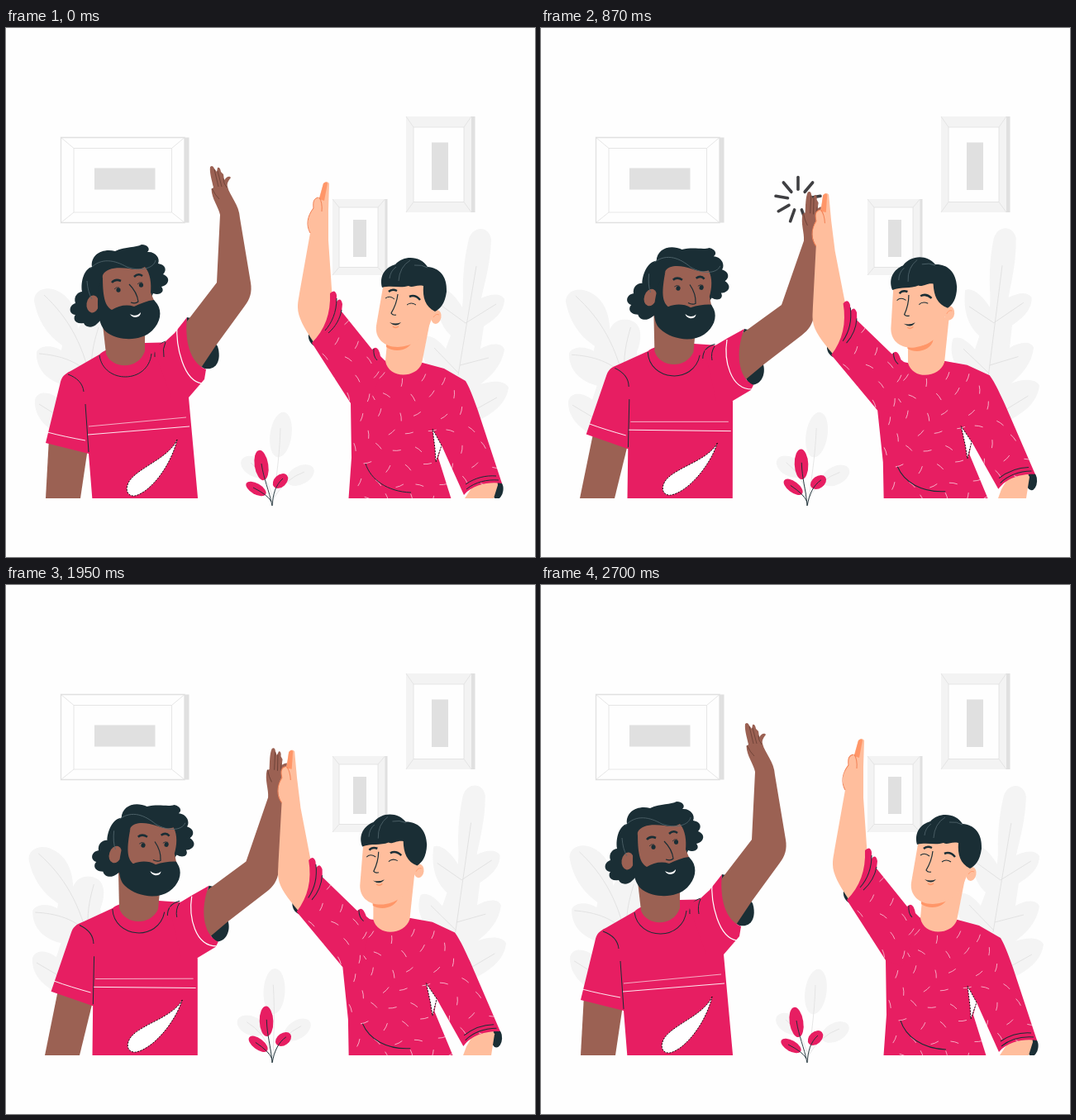
An HTML page with a canvas for the animation above (2.73 s loop, 640 px wide and 640 px high).

```html
<!DOCTYPE html>
<html lang="en">
<head>
<meta charset="utf-8">
<title>High five</title>
<style>
html, body { margin: 0; width: 100%; height: 100%; overflow: hidden; background: #fefefe; }
canvas { display: block; width: 640px; height: 640px; }
</style>
</head>
<body>
<canvas id="stage" width="640" height="640"></canvas>
<script>
const ctx = document.getElementById('stage').getContext('2d');
const LOOP = 2730, STEP = 30, FLOOR = 569;
const PINK = '#e71e62', DARK = '#1a2e35', BROWN = '#9b6153', PEACH = '#ffbe9d',
  ORANGE = '#ff9668', LEAF = '#f4f4f4', GREY = '#e0e0e0', PAPER = '#fefefe';

// Cosine-eased interpolation through [time, value] keys.
function keys(t, list) {
  for (let i = 1; i < list.length; i++) {
    const [t0, a] = list[i - 1], [t1, b] = list[i];
    if (t <= t1) return a + (b - a) * (1 - Math.cos(Math.PI * (t - t0) / (t1 - t0))) / 2;
  }
  return list[list.length - 1][1];
}

function fill(d, color) {
  ctx.fillStyle = color;
  ctx.fill(new Path2D(d));
}

function line(d, color = DARK, width = 1, dash = []) {
  ctx.strokeStyle = color;
  ctx.lineWidth = width;
  ctx.setLineDash(dash);
  ctx.stroke(new Path2D(d));
  ctx.setLineDash([]);
}

function oval(x, y, rx, ry, color, deg = 0) {
  ctx.fillStyle = color;
  ctx.beginPath();
  ctx.ellipse(x, y, rx, ry, deg * Math.PI / 180, 0, 2 * Math.PI);
  ctx.fill();
}

function box(x0, y0, x1, y1, color) {
  ctx.fillStyle = color;
  ctx.fillRect(x0, y0, x1 - x0, y1 - y0);
}

// Rotates a part about (x, y) while that point travels by (dx, dy).
function part(x, y, deg, draw, dx = 0, dy = 0) {
  ctx.save();
  ctx.translate(x + dx, y + dy);
  ctx.rotate(deg * Math.PI / 180);
  ctx.translate(-x, -y);
  draw();
  ctx.restore();
}

// Blends two paths with the same commands.
function morph(from, to, k) {
  const ends = to.match(/-?[\d.]+/g);
  let i = 0;
  return from.replace(/-?[\d.]+/g, n => +n + (ends[i++] - n) * k);
}

function pictureFrame([x0, y0, x1, y1], [a0, b0, a1, b1], bar, depth, face) {
  box(x0, y0, x1 + depth, y1, GREY);
  box(x0, y0, x1, y1, face);
  box(a0, b0, a1, b1, PAPER);
  line(`M${x0} ${y0}L${a0} ${b0}M${x1} ${y0}L${a1} ${b0}M${x0} ${y1}L${a0} ${b1}M${x1} ${y1}L${a1} ${b1}` +
    `M${a0} ${b0}H${a1}V${b1}H${a0}Z`, GREY, 0.8);
  if (face === PAPER) line(`M${x0} ${y0}H${x1}V${y1}H${x0}Z`, GREY, 1.3);
  box(...bar, GREY);
}

function pictures() {
  pictureFrame([66.5, 132.5, 216, 235.5], [82, 145.5, 200.5, 223], [107, 169.5, 180.5, 195.5], 5.5, PAPER);
  pictureFrame([484, 107, 563, 223], [493, 120, 554, 210.5], [515, 138.5, 535, 196], 4.5, '#f3f3f3');
  pictureFrame([395, 207, 458.5, 299], [403, 217, 450, 289.5], [420, 232, 436, 277], 3, '#f3f3f3');
}

function leftPlant() {
  fill('M34 330C34 316 50 312 62 318C79 326 86 342 87 364C92 352 106 349 117 356C126 363 125 378 119 392' +
    'L135 500L70 495C42 482 34 465 35 450C38 438 54 440 64 449L70 432C45 425 36 408 37 392C42 383 57 384 67 390' +
    'L68 384C48 370 38 352 34 330Z', LEAF);
  line('M46 323C75 350 96 385 105 440M105 425C100 400 108 375 112 362M40 394C65 396 90 403 106 425M40 455L80 480', GREY, 0.9);
}

function rightPlant() {
  fill('M553 325C552 295 556 272 560 255C566 238 585 240 587 256C586 285 580 305 575 327C586 322 598 320 603 328' +
    'C603 343 592 352 578 361L574 388C586 381 600 380 603 389C600 408 588 420 574 431C588 426 604 426 608 435' +
    'C605 456 588 466 572 475L530 480L520 420C505 408 500 390 506 374C514 370 524 378 532 388L538 372' +
    'C522 357 520 335 523 316C532 312 545 325 552 338Z', LEAF);
  line('M569 288L547 420M556 357L527 336M556 357L593 334M549 408L584 399M548 418L518 387M560 466L594 447', GREY, 0.9);
}

function smallPlant(greyLean, redLean) {
  part(323, 577, greyLean, () => {
    oval(332.5, 492, 13, 27.5, LEAF, 8);
    oval(301, 531, 18, 11.5, LEAF, 28);
    oval(356, 541, 18, 11, LEAF, -28);
    line('M332 484C331 520 326 550 323 577M296 526Q315 540 322 565M361 537Q338 545 323 570', GREY, 0.8);
  });
  part(322, 578, redLean, () => {
    oval(309, 529, 8.3, 18.3, PINK, -9);
    oval(302.5, 557.5, 13.5, 6.6, PINK, 30);
    oval(332, 548, 10.5, 7.3, PINK, -42);
    line('M309 527C312 547 318 558 322 578M299 556Q317 565 321 573M335 545C326 553 323 564 322 578', DARK, 0.9);
  });
}

function burst(x, y, age) {
  const u = age / 500;
  if (u <= 0 || u >= 1) return;
  const outer = 71 * Math.sin(u * Math.PI / 2) - 2;
  const inner = Math.min(outer - 2, 74 * u ** 1.45 + 1.5);
  if (inner < 0) return;
  ctx.lineCap = 'round';
  for (let i = 0; i < 9; i++) {
    const a = (i * 40 - 90) * Math.PI / 180, c = Math.cos(a), s = Math.sin(a);
    line(`M${x + c * inner} ${y + s * inner}L${x + c * outer} ${y + s * outer}`, '#3f3f42', 3.6);
  }
  ctx.lineCap = 'butt';
}

function leftTorso() {
  fill('M48 502L66 428C68 420 74 417 80 414L113 395C122 386 140 385 168 381L208 380L221 447L234 590H106L100 515Z', PINK);
  fill('M116 350L121 394C128 413 160 414 168 391V350Z', BROWN);
  line('M113 396C118 431 172 431 176 394M75 419C86 423 93 430 94 440M96 455L100 513M180 398C179 388 185 382 193 379');
  line('M99 492L222 482M50 489C65 493 80 496 96 499', '#fff', 0.9);
  line('M100 482L218 471', '#f8bed0', 0.9);
  const gap = 'M207 498C197 520 162 531 150 547C143 557 146 567 156 566C176 561 200 528 207 498Z';
  fill(gap, '#fff');
  line(gap, '#000', 0.9, [2, 1.5]);
}

function leftHead() {
  fill('M110 358C104 364 96 362 94 357C82 359 81 350 84 347C75 346 76 335 84 333C81 324 88 319 92 319' +
    'C90 306 95 291 104 289C102 275 116 266 132 270C145 264 157 266 164 262C172 262 175 268 171 271' +
    'C181 270 187 279 184 285C193 286 195 293 190 298C200 302 197 311 188 313C193 319 186 324 178 321L170 340L120 348Z', DARK);
  oval(105, 334, 7.5, 10.5, BROWN, 8);
  fill('M113 325L117 299C121 290 135 289 149 291C159 293 165 291 168 289C175 297 176 310 175 320L181 334L160 350L118 348Z', BROWN);
  fill('M112 315C109 345 113 362 123 369C140 380 165 378 177 366C187 356 189 343 183 334L179 329C171 330 163 333 155 337' +
    'C146 334 136 336 128 341C119 336 117 323 117 300Z', DARK);
  fill('M150 346C155 349 160 348 163 344C163 351 153 352 150 346Z', '#fff');
  line('M102 291C115 277 132 281 146 289C162 295 179 291 181 281M104 328Q99 320 98 306', '#53686f', 0.8);
  line('M149 310C156 317 159 323 160 331C157 334 154 333 151 332', DARK, 1.2);
  line('M128 308Q132 303 139 306M155 301Q160 296 165 300', DARK, 2.5);
  oval(136, 317, 2.6, 2.8, DARK);
  oval(163.5, 311, 2.6, 2.8, DARK);
  line('M131 316Q133 313 137 314M159 310Q161 307 165 308', DARK, 0.8);
}

function leftArm() {
  fill('M215 360L255 308L259 226C257 216 249 207 248.5 195L251 193C249 184 246 175 247 168Q250 165 252 170L255 174' +
    'L256 169Q259 168 260 174L263 177L264 184C266 181 270 178 272 181C269 185 267 188 268 192' +
    'C271 204 282 213 283 230L296 308C298 320 295 328 289 336L254 384L236 411L210 405Z', BROWN);
  line('M252 171L257 192M256 173L261 192M263 182Q263 188 267 193M249 194Q253 202 258 207', '#5f382f', 0.7);
}

function leftMan(body, arm, head) {
  fill(morph('M52 496L99 505L98 515L90 569H48Z', 'M64 486L106 498L104 508L89 569H47Z', body), BROWN);
  part(165, 569, 5.3 * body, leftTorso);
  part(136, 317, 10.5 * head, leftHead, 30 * head, -2 * head);
  fill(morph('M219 350C214 375 223 404 240 412C258 415 260 397 256 385L228 352Z',
    'M246 364C236 390 244 425 254 432C270 432 273 412 267 403L255 366Z', arm), DARK);
  part(255, 308, 16.4 * arm, leftArm, 36 * arm, 27 * arm);
  fill(morph('M178 386L192 380L204 369L219 350C216 377 222 405 242 413L240 425L221 447L200 447Z',
    'M198 390L211 384L226 375L246 364C235 391 238 423 257 432L254 438L232 451L212 451Z', arm), PINK);
  line(morph('M207 357C205 386 215 427 237 430', 'M225 377C221 402 229 437 255 437', arm), '#fff', 1.2);
  line(morph('M193 380Q189 388 191 398', 'M210 385Q205 393 207 402', arm));
}

const noise = n => Math.abs(Math.sin(n * 127.1 + 3.3) * 43758.5453) % 1;

// Sparse loose strokes on a jittered lattice, clipped to the cloth.
function sprinkle(cloth, x0, y0, x1, y1) {
  ctx.save();
  ctx.clip(new Path2D(cloth));
  let n = 0;
  for (let y = y0, row = 0; y < y1; y += 21, row++) {
    for (let x = x0 + row % 2 * 12; x < x1; x += 25, n += 3) {
      const a = noise(n) * Math.PI, px = x + 10 * noise(n + 1), py = y + 9 * noise(n + 2);
      const c = 5 * Math.cos(a), s = 5 * Math.sin(a);
      line(`M${px - c} ${py - s}Q${px + s * 0.2} ${py - c * 0.2} ${px + c} ${py + s}`, '#f9cddb', 0.8);
    }
  }
  ctx.restore();
}

function rightTorso() {
  const cloth = 'M417 453L440 398C449 400 455 402 460 403L504 405L530 412L556 427C562 437 567 452 571 463' +
    'L600 551C586 549 566 551 554 565L527 505L523 520L545 590H413L418 520Z';
  fill(cloth, PINK);
  sprinkle(cloth, 422, 420, 600, 569);
  fill('M462 370L459 403C463 425 496 424 503 406L514 350Z', PEACH);
  fill('M460 380C468 386 482 385 492 378C488 391 470 393 460 386Z', ORANGE);
  line('M435 527C441 546 461 561 490 562M556 552C568 544 580 541 593 542M557 558C568 549 582 546 596 547', DARK, 1);
  const gap = 'M516 485L527 505L520 525L519 509Z';
  fill(gap, '#fff');
  line(gap, '#000', 0.9, [2, 1.5]);
}

function rightHead() {
  fill('M457 308L448 360C446 375 457 386 474 386C493 385 504 376 511 362L520 340L510 298Z', PEACH);
  oval(520.5, 349.5, 6, 8.5, PEACH, 12);
  fill('M455 314C451 299 460 289 471 286C482 274 502 276 510 289C524 290 534 300 533 319C531 334 525 340 519 343' +
    'C507 337 504 326 505 312C496 310 492 315 487 312C477 315 466 311 455 314Z', DARK);
  line('M475 306Q476 289 489 281M464 303Q465 294 472 289M510 290Q503 286 494 287', '#53686f', 0.8);
  line('M474 322C473 331 469 340 466 345Q468 348 472 347', DARK, 1.2);
  line('M463 319Q467 315 473 318M488 325Q495 322 501 329', DARK, 2.5);
  line('M459 327Q464 323 470 328M485 335Q490 331 496 335', DARK, 1);
  fill('M464 356Q471 359 478 356Q472 363 464 356Z', DARK);
  line('M468 361Q471 364 475 361', ORANGE, 1.4);
  line('M517 350Q520 345 524 347', ORANGE, 0.8);
}

function rightArm() {
  fill('M367 367C364 374 367 382 374 385L392 350Z', DARK);
  fill('M353 338C353 331 354 328 355 321L368 248C364 239 364 228 372 217C371 209 373 205 379 205L384 188' +
    'Q388 184 391 188L390 220L390 257L395 330L392 375L372 380C361 363 353 350 353 338Z', PEACH);
  fill('M379 207L384 188Q388 185 389 188L385 209Z', ORANGE);
  line('M368 248C363 239 364 228 372 218C371 209 373 206 378 205M379 205Q383 211 382 222', '#f28155', 1);
  const sleeve = 'M392 321Q398 315 400 323L400 331Q405 325 407 334L406 343L443 389Q450 382 453 397L459 403L437 462L417 454L370 381C386 365 393 345 392 321Z';
  fill(sleeve, PINK);
  sprinkle(sleeve, 380, 355, 450, 455);
  line('M406 341C404 352 399 361 390 369M400 327C400 344 394 357 386 366M445 388Q444 397 449 402', DARK, 1);
}

function rightMan(body, head) {
  const inTorso = draw => part(475, 569, -5.2 * body, draw);
  inTorso(() => oval(595, 559, 6.5, 11, DARK, 8));
  fill(morph('M555 569L565 554L574 545L594 545L595 553L590 569Z',
    'M553 569L557 558L566 543L588 538L591 543L587 569Z', body), PEACH);
  inTorso(rightTorso);
  part(471, 358, -6.5 * head, rightHead, -25 * head, head);
  part(353, 338, -7.1 * body, rightArm, -24 * body, 17 * body);
}

function render(t) {
  const lean = (list, rest, height) => (keys(t, list) - rest) / height * 180 / Math.PI;
  const body = keys(t, [[0, 0], [80, 0], [840, 1], [1870, 1], [2710, 0]]);
  const arm = keys(t, [[0, 0], [800, 1], [1885, 1], [2710, 0]]);
  const nod = keys(t, [[0, 0], [800, 1], [900, 1], [1320, 0.88], [1700, 1], [1990, 1], [2710, 0]]);
  const tilt = keys(t, [[0, 0], [880, 1], [1300, 0.8], [2080, 0.8], [2710, 0]]);

  box(0, 0, 640, 640, PAPER);
  part(110, 560, lean([[0, 33], [630, 26], [1350, 37], [2100, 25], [2730, 33.5]], 33, 240), leftPlant);
  part(545, 560, lean([[0, 574], [810, 561], [1650, 578], [2200, 558], [2730, 574]], 574, 317), rightPlant);
  pictures();
  smallPlant(
    lean([[0, 333], [400, 328], [1250, 339], [2050, 322], [2730, 333]], 333, 111),
    lean([[0, 306], [500, 315], [870, 314], [1350, 309], [1710, 313], [2100, 314.5], [2730, 306]], 306, 66));
  burst(311, 208, t - 734);
  burst(358, 207.5, t - 1267);

  ctx.save();
  ctx.beginPath();
  ctx.rect(0, 0, 640, FLOOR);
  ctx.clip();
  leftMan(body, arm, nod);
  rightMan(body, tilt);
  ctx.restore();
}

function tick() {
  render(Math.floor(performance.now() % LOOP / STEP) * STEP);
  requestAnimationFrame(tick);
}
tick();
</script>
</body>
</html>
```
